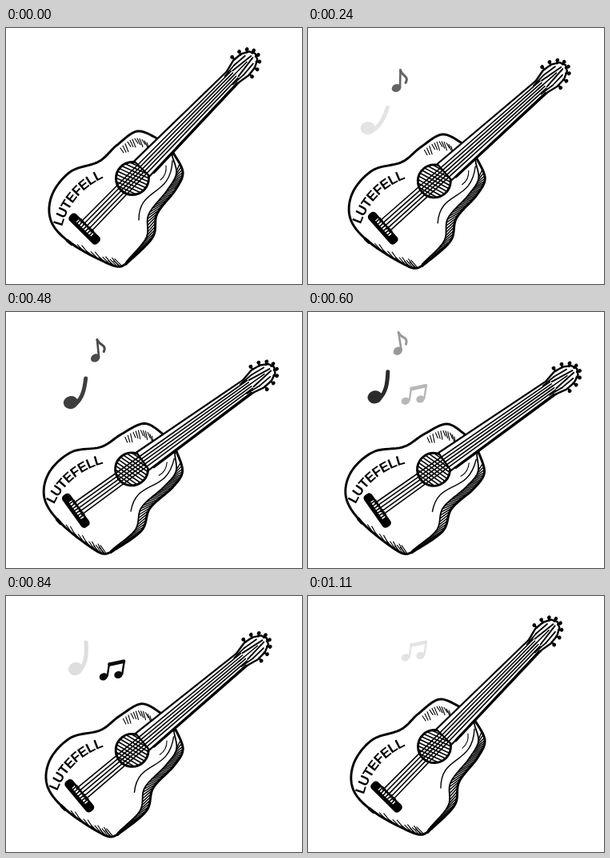
An HTML page with a canvas for the animation above (1.14 s loop, 370 by 320 pixels).

```html
<!DOCTYPE html>
<html lang="en">
<head>
<meta charset="utf-8">
<title>Guitar</title>
<style>
html, body { margin: 0; width: 100%; height: 100%; overflow: hidden; background: #fff; }
canvas { display: block; }
</style>
</head>
<body>
<canvas id="stage" width="370" height="320"></canvas>
<script>
const ctx = document.getElementById('stage').getContext('2d');
const LOOP = 1140, STEP = 30, TAU = Math.PI * 2, DEG = Math.PI / 180;
const SWING = 10.5 * DEG, PIVOT = [109, 187];
const HOLE = [158, 188], NECK_ANGLE = -45.5 * DEG;
const LABEL = 'LUTEFELL';

// Key points of the body, joined by smooth curves
const leftKeys = [[189,138],[164,129],[138,147],[116,167],[80,180],[57,210],[57,243],[84,271],[134,297],[150,295]];
const rightKeys = [[209,156],[221,180],[212,202],[189,232],[183,262],[150,295]];

// Point on a Catmull-Rom curve, u from 0 to 1
function at(keys, u) {
  const last = keys.length - 1;
  const x = Math.min(Math.max(u, 0), 1) * last;
  const i = Math.min(Math.floor(x), last - 1), k = x - i;
  const key = j => keys[Math.min(Math.max(j, 0), last)];
  return [0, 1].map(c => {
    const a = key(i - 1)[c], b = key(i)[c], d = key(i + 1)[c], e = key(i + 2)[c];
    return b + 0.5 * k * (d - a + k * (2 * a - 5 * b + 4 * d - e + k * (3 * (b - d) + e - a)));
  });
}

const leftEdge = u => at(leftKeys, u);
const rightEdge = u => at(rightKeys, u);

// The front face ends a little inside the right edge
function faceEdge(u) {
  const [x, y] = rightEdge(u);
  const inset = Math.pow(Math.sin(Math.PI * Math.min(Math.max(u, 0), 1)), 0.6);
  return [x - 11 * inset, y + inset];
}

function trace(point, width) {
  ctx.lineWidth = width;
  ctx.beginPath();
  for (let i = 0; i <= 80; i++) ctx.lineTo(...point(i / 80));
  ctx.stroke();
}

function line(x1, y1, x2, y2, width) {
  ctx.lineWidth = width;
  ctx.beginPath();
  ctx.moveTo(x1, y1);
  ctx.lineTo(x2, y2);
  ctx.stroke();
}

function bend(x1, y1, cx, cy, dx, dy, x2, y2, width) {
  ctx.lineWidth = width;
  ctx.beginPath();
  ctx.moveTo(x1, y1);
  ctx.bezierCurveTo(cx, cy, dx, dy, x2, y2);
  ctx.stroke();
}

function oval(x, y, rx, ry, tilt = 0) {
  ctx.beginPath();
  ctx.ellipse(x, y, rx, ry, tilt, 0, TAU);
  ctx.fill();
}

// Band around the x axis, symmetric, with half widths a and b
function taper(x1, a, x2, b) {
  ctx.beginPath();
  ctx.moveTo(x1, -a);
  ctx.lineTo(x2, -b);
  ctx.lineTo(x2, b);
  ctx.lineTo(x1, a);
  ctx.closePath();
}

function drawBody() {
  trace(leftEdge, 2.9);
  trace(rightEdge, 3);
  trace(faceEdge, 1.8);
  line(77, 266, 82, 270, 4);
  bend(208, 166, 206, 212, 166, 198, 166, 240, 1.4);
  bend(200, 172, 201, 181, 198, 186, 193, 190, 1.1);

  // Shading: side wall, upper bout, lower rim
  for (let u = 0.12; u < 0.95; u += 0.028) {
    line(...rightEdge(u), ...faceEdge(u + 0.07), 1.4);
  }
  for (let i = 0; i < 12; i++) {
    const x = 143 + i * 3, y = 150 - 12 * Math.sin(i * 0.23);
    line(x, y, x + 4, y + 6 + i % 3 * 2, 1.1);
  }
  for (let i = 0; i < 14; i++) {
    const [x, y] = leftEdge(0.8 + i * 0.011);
    line(x, y, x - 9, y - 7 - i % 3 * 2, 1.1);
  }
}

function drawLabel() {
  const radius = 96;
  ctx.font = 'bold 17px "Liberation Sans", Arial, sans-serif';
  ctx.textAlign = 'center';
  ctx.textBaseline = 'middle';
  ctx.fillStyle = '#000';
  let x = -ctx.measureText(LABEL).width / 2;
  for (const ch of LABEL) {
    const w = ctx.measureText(ch).width;
    ctx.save();
    ctx.translate(158.5, 271);
    ctx.rotate(-49.5 * DEG + (x + w / 2) / radius);
    ctx.fillText(ch, 0, -radius);
    ctx.restore();
    x += w;
  }
}

function drawHole() {
  ctx.save();
  ctx.beginPath();
  ctx.arc(0, 0, 20.5, 0, TAU);
  ctx.save();
  ctx.clip();
  for (let x = -26; x <= 26; x += 4.4) line(x - 8, -22, x + 8, 22, 1.6);
  ctx.restore();
  ctx.lineWidth = 2.9;
  ctx.beginPath();
  ctx.arc(0, 0, 20.5, 0, TAU);
  ctx.stroke();
  ctx.restore();
}

function drawHead() {
  // Rounded outline that starts at the end of the neck
  ctx.beginPath();
  ctx.moveTo(178, -9.5);
  for (let i = -3; i <= 3; i++) {
    const a = i * 32 * DEG;
    ctx.lineTo(196 + 23 * Math.cos(a), 13.5 * Math.sin(a));
  }
  ctx.lineTo(178, 10.5);
  ctx.fillStyle = '#fff';
  ctx.fill();
  ctx.lineWidth = 2.4;
  ctx.stroke();

  for (const side of [-1, 1]) {
    line(172, side * 7, 190, side * 8.5, 1.8);
    line(190, side * 8.5, 208, side * 7, 1.8);
    line(184, side * 5, 213, side * 1.5, 2);
  }
  line(172, 0, 204, 0, 1.5);

  ctx.fillStyle = '#000';
  for (let i = 0; i < 8; i++) {
    const a = (i * 26 - 91) * DEG, c = Math.cos(a), s = Math.sin(a);
    line(196 + 21 * c, 13 * s, 196 + 25 * c, 17.5 * s, 2.2);
    oval(196 + 25 * c, 17.5 * s, 2.5, 2.3);
  }
}

function drawBridge() {
  ctx.fillStyle = '#000';
  ctx.beginPath();
  ctx.roundRect(-93, -23, 12, 49, 4.5);
  ctx.fill();
  ctx.fillStyle = '#fff';
  ctx.fillRect(-88, -12, 4.5, 26);
  for (let y = -10; y <= 12; y += 3.6) line(-90, y, -81, y, 1.6);
}

// Drawn with x along the neck and y across it, from the sound hole
function drawNeck() {
  ctx.save();
  ctx.translate(...HOLE);
  ctx.rotate(NECK_ANGLE);
  drawHole();
  taper(17, 13.5, 180, 9.5);
  ctx.fillStyle = '#fff';
  ctx.fill();
  ctx.lineWidth = 2.2;
  ctx.stroke();
  line(24, 14, 180, 10.5, 3);
  drawHead();
  drawBridge();
  for (let i = -2; i <= 2; i++) line(-84, i * 4.4 + 1, 182, i * 3, 1.6);
  ctx.restore();
}

function drawGuitar(t) {
  ctx.save();
  ctx.translate(...PIVOT);
  ctx.rotate(SWING * (1 - Math.cos(TAU * t / LOOP)) / 2);
  ctx.translate(-PIVOT[0], -PIVOT[1]);
  ctx.strokeStyle = '#000';
  drawBody();
  drawLabel();
  drawNeck();
  ctx.restore();
}

// Fades in from start to peak, then out until end
function note(t, start, peak, end, x, y, turn, draw) {
  if (t <= start || t >= end) return;
  const ink = t < peak ? (t - start) / (peak - start) : (end - t) / (end - peak);
  const v = Math.round(255 - 245 * ink);
  ctx.save();
  ctx.fillStyle = ctx.strokeStyle = `rgb(${v},${v},${v})`;
  ctx.translate(x, y);
  ctx.rotate(turn);
  draw();
  ctx.restore();
}

function quaver() {
  oval(-4.5, 9.5, 6, 4.8, -0.4);
  line(0, 9, 0.5, -13, 2.6);
  bend(0.5, -13, 2, -5, 12, -6, 7, 3, 3);
}

function hook() {
  oval(-14, 35, 9.2, 8, -0.35);
  bend(-1, 2, 0, 17, -1, 28, -8, 36, 5);
}

function beamed() {
  for (const side of [-1, 1]) {
    const x = side * 9.3, y = 7.2 - side * 1.2;
    oval(x - 0.8, y, 5.3, 4.5, -0.35);
    line(x + 4, y - 1, x + 6.5, y - 17, 2.4);
  }
  line(-2.5, -7, 15, -10.8, 4.6);
}

function drawNotes(t) {
  const rise = (y, t0) => y - 0.07 * (t - t0);
  note(t, 0, 380, 757, 115, 65.5 - 0.075 * (t - 240), -0.0005 * (t - 240), quaver);
  const lean = Math.max(0, 1 - (t - 240) / 600);
  note(t, 200, 555, 885, 101, rise(98, 240), 22 * DEG * Math.pow(lean, 1.5), hook);
  const age = t - 720;
  note(t, 500, 840, 1145, 132, 99 - 0.0435 * age - 0.000089 * age * age, 0, beamed);
}

function frame(now) {
  const t = Math.floor(now % LOOP / STEP) * STEP;
  ctx.fillStyle = '#fff';
  ctx.fillRect(0, 0, 370, 320);
  ctx.lineCap = ctx.lineJoin = 'round';
  drawGuitar(t);
  drawNotes(t);
  requestAnimationFrame(frame);
}

requestAnimationFrame(frame);
</script>
</body>
</html>
```
